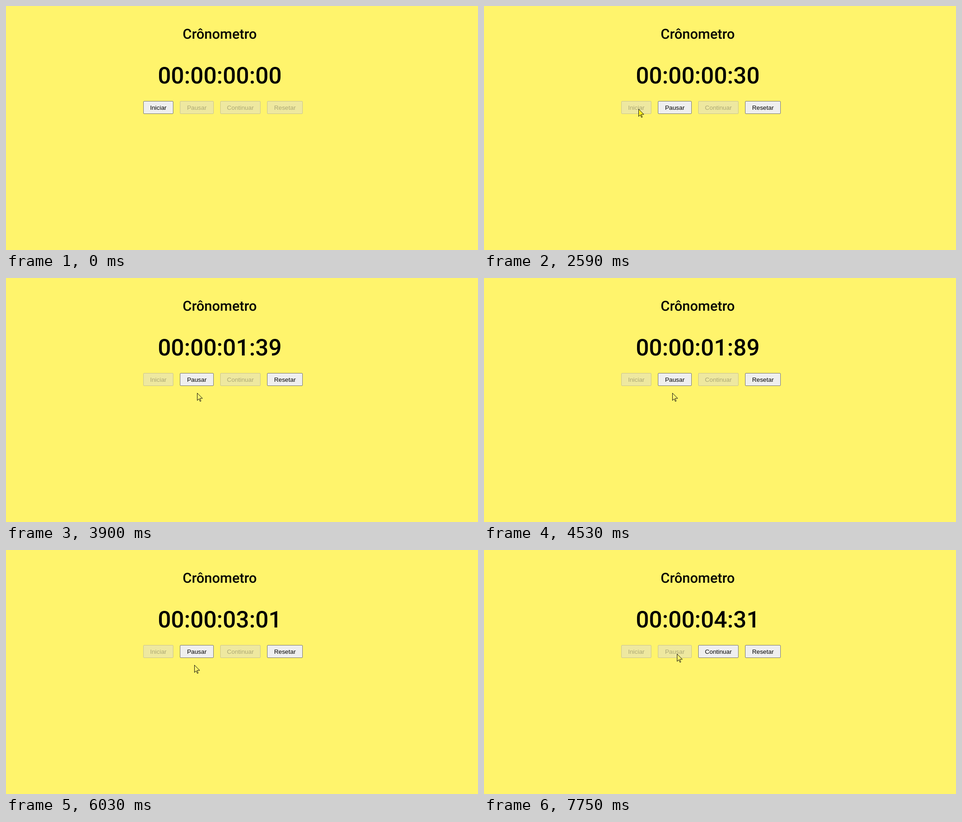
Animation of 1018x529 px, one loop 8000 ms. Source, as an HTML page:

```html
<!DOCTYPE html>
<html lang="pt">
<head>
<meta charset="utf-8">
<title>Crônometro</title>
<style>
  html, body { margin: 0; width: 100%; height: 100%; overflow: hidden; background: #fff46c; }
  div, button, svg { position: absolute; }
  .line { left: 0; width: 922px; text-align: center; font-family: Roboto, sans-serif;
    font-weight: 500; text-rendering: geometricPrecision; }
  .title { top: 44px; font-size: 30px; line-height: 35px; }
  .clock { top: 123px; font-size: 50px; line-height: 59px; }
  button { top: 206px; height: 28px; padding: 0; box-sizing: border-box; pointer-events: none;
    font: 13.333px "Liberation Sans", Arial, sans-serif;
    color: #000; background: #efefef; border: 1px solid #767676; border-radius: 2px; }
  button:disabled { color: #aba775; background: #eee8a0; border-color: #cac592; }
  svg { left: 0; top: 0; }
</style>
</head>
<body>
<div class="line title">Crônometro</div>
<div class="line clock" id="clock"></div>
<svg width="1018" height="529" style="z-index: 1">
  <path id="cursor" d="M0 0V16L3.6 12.5L6 18L8 17.5L5.8 11.5H11.3Z" stroke="#111"/>
</svg>
<script>
const LOOP = 8000, ENTER = 490, START = 2240, PAUSE = 7740;

// Clock readings in hundredths; the pace varies a little between them
const readings = [[START, 0], [3330, 94.5], [4530, 189.5], [5230, 247.5], [6820, 354.5], [PAUSE, 431.5]];

// Pointer strokes: from, to, end x, end y; it rests in between
const strokes = [
  [ENTER, 770, 385, 245], [770, 940, 221, 197], [940, 1340, 329, 219], [2070, 2200, 333, 223],
  [2640, 2930, 440, 255], [3100, 3250, 437, 249], [3710, 3950, 406, 249],
  [6170, 6350, 406, 245], [6980, 7600, 416, 225]];

const progress = (t, from, to) => Math.min(1, Math.max(0, (t - from) / (to - from)));
const pad = n => String(n).padStart(2, "0");

function hundredths(t) {
  let n = 0;
  for (let i = 1; i < readings.length; i++) {
    const [from, a] = readings[i - 1], [to, b] = readings[i];
    n += (b - a) * progress(t, from, to);
  }
  return Math.floor(n + 1e-6);
}

function pointer(t) {
  let x = 908, y = 520;
  for (const [from, to, endX, endY] of strokes) {
    const p = progress(t, from, to);
    x += (endX - x) * p;
    y += (endY - y) * p;
  }
  return [Math.round(x) + .5, Math.round(y) + .5];
}

function addButton(label, left, width) {
  const button = document.createElement("button");
  button.textContent = label;
  button.style.left = left + "px";
  button.style.width = width + "px";
  document.body.append(button);
  return button;
}

const clock = document.getElementById("clock"), cursor = document.getElementById("cursor");
const start = addButton("Iniciar", 296, 65);
const pause = addButton("Pausar", 375, 73);
const resume = addButton("Continuar", 462, 87);
const reset = addButton("Resetar", 563, 77);

function draw(t) {
  const n = hundredths(t);
  clock.textContent = `00:00:${pad(Math.floor(n / 100))}:${pad(n % 100)}`;

  start.disabled = t >= START;
  pause.disabled = t < START || t >= PAUSE;
  resume.disabled = t < PAUSE;
  reset.disabled = t < START;

  cursor.setAttribute("visibility", t < ENTER ? "hidden" : "visible");
  cursor.setAttribute("transform", `translate(${pointer(t)})`);
  cursor.setAttribute("fill", t < 3700 ? "#fff01e" : "#fff46c");
}

const begin = performance.now();
function frame() {
  draw((performance.now() - begin) % LOOP);
  requestAnimationFrame(frame);
}
frame();
</script>
</body>
</html>
```
